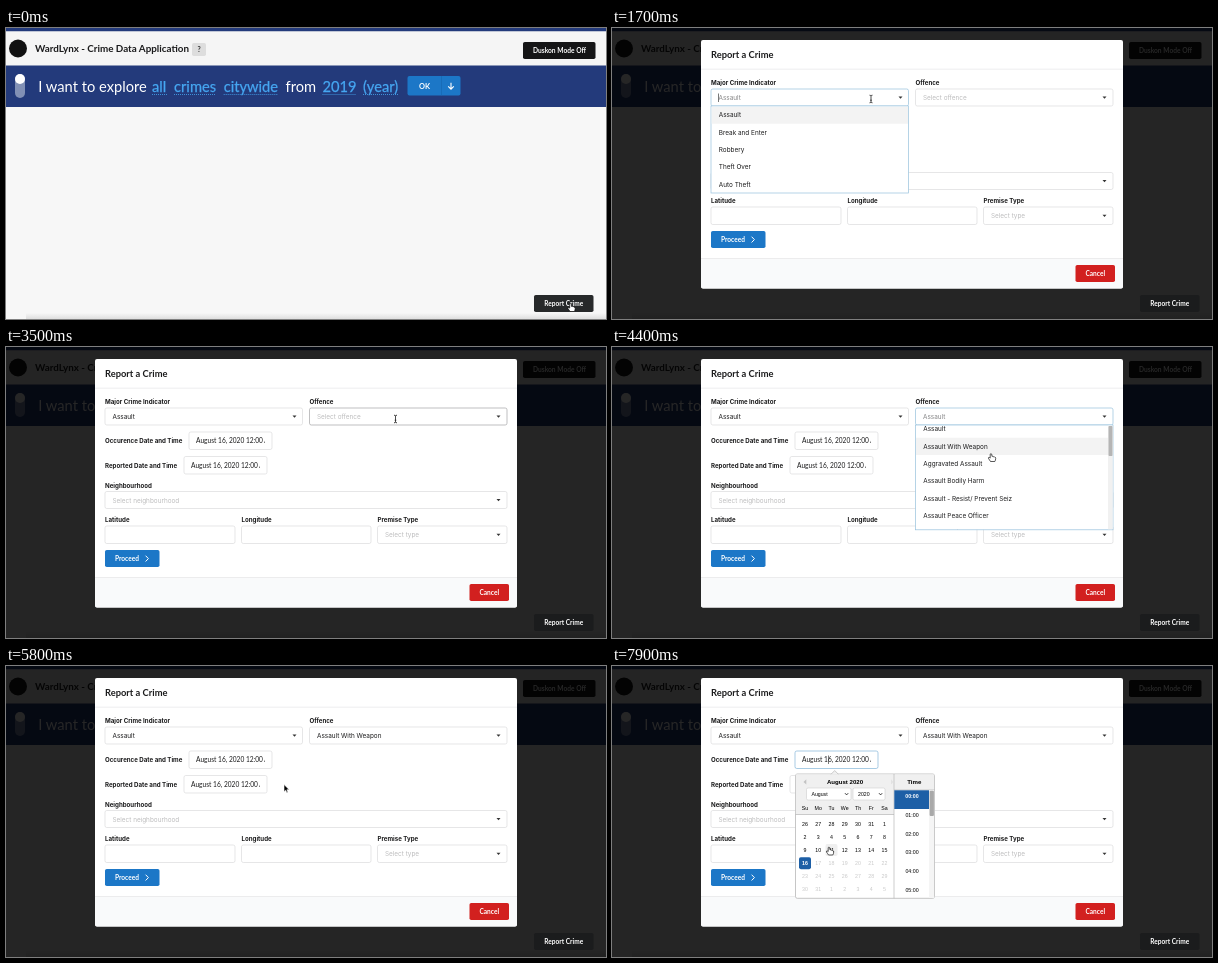
An HTML page that plays this animation: 600x291 px, repeating every 8 s.

```html
<!DOCTYPE html>
<html lang="en">
<head>
<meta charset="utf-8">
<title>Crime report form</title>
<style>
  html, body { margin: 0; width: 100%; height: 100%; overflow: hidden; background: #f7f7f7; }
  svg { display: block; width: 600px; height: 291px; }
  text { white-space: pre; }
  .lato { font-family: Lato, sans-serif; }
  .ui { font-family: Inter, sans-serif; }
  .cal { font-family: "Liberation Sans", Arial, sans-serif; }
</style>
</head>
<body>
<svg id="stage" viewBox="0 0 600 291" xmlns="http://www.w3.org/2000/svg"></svg>
<script>
const LOOP = 8000;
const INK = '#1c1c1d', HINT = '#bdbdbe', LINE = '#dcdcdd', BLUE = '#1c77c7', FOCUS = '#96c0dc';

const rect = (x, y, x2, y2, fill, more = '') =>
  `<rect x="${x}" y="${y}" width="${x2 - x}" height="${y2 - y}" fill="${fill}" ${more}/>`;
// cy is the middle of the capitals
const text = (x, cy, str, size, font, fill = INK, more = '') =>
  `<text x="${x}" y="${cy + size * 0.36}" class="${font}" font-size="${size}" fill="${fill}" ${more}>${str}</text>`;
const BOLD = 'font-weight="700"', MID = 'text-anchor="middle"', END = 'text-anchor="end"';
const group = (id, body, more = '') => `<g id="${id}" ${more}>${body}</g>`;
const clip = (id, ...box) => `<clipPath id="${id}">${rect(...box, '#000')}</clipPath>`;

const label = (x, cy, str) => text(x, cy, str, 6.15, 'ui', INK, BOLD);
const value = (x, cy, str, fill, more) => text(x, cy, str, 6.4, 'ui', fill, more);
const field = (x, y, x2, y2, id = '') =>
  rect(x, y, x2, y2, '#fff', `rx="1.8" stroke="${LINE}" stroke-width=".7" ${id && `id="${id}"`}`);
const caret = (x, y) => `<path d="M${x - 2} ${y - 1}h4l-2 2.3z" fill="#333"/>`;
const button = (x, y, x2, y2, str, fill, id = '') =>
  rect(x, y, x2, y2, fill, `rx="1.8" ${id && `id="${id}"`}`) +
  text((x + x2) / 2, (y + y2) / 2, str, 6.55, 'lato', '#fff', `${BOLD} ${MID}`);

function page() {
  const words = [
    [32.3, 'I want to explore'], [146, 'all', 161], [168, 'crimes', 210], [217.7, 'citywide', 272],
    [279.5, 'from'], [316.5, '2019', 350], [357, '(year)', 393]
  ].map(([x, str, end]) => {
    const color = end ? '#46a7f2' : '#fff';
    return text(x, 58.5, str, 14.7, 'lato', color, end ? `stroke="${color}" stroke-width=".25"` : '') +
      (end ? `<path d="M${x} 66.5H${end}" stroke="${color}" stroke-width=".8" stroke-dasharray="1 1"/>` : '');
  }).join('');
  return rect(0, 0, 600, 291, '#f7f7f7') +
    rect(0, 0, 600, 3.5, '#233a7b') + rect(0, 3.5, 600, 37.5, '#f5f5f5') +
    rect(0, 37.5, 600, 79, '#233a7b') +
    rect(20, 285, 600, 291, 'url(#shade)') +
    '<circle cx="12" cy="20.5" r="9" fill="#111"/>' +
    text(29, 20.5, 'WardLynx', 9.85, 'lato', INK, BOLD) +
    text(183, 20.5, '- Crime Data Application', 9.85, 'lato', INK, `${BOLD} ${END}`) +
    rect(186, 15, 200, 28, '#dddddd', 'rx="1.8"') +
    text(193, 21.5, '?', 7, 'lato', '#333', `${BOLD} ${MID}`) +
    rect(517, 14, 589.5, 31, '#151516', 'rx="1.8"') +
    text(527, 22.5, 'Duskon', 6.65, 'lato', '#fff', BOLD) +
    text(580, 22.5, 'Mode Off', 6.65, 'lato', '#fff', `${BOLD} ${END}`) +
    rect(9, 46, 19, 70, '#8190b5', 'rx="5"') + '<circle cx="14" cy="51" r="5" fill="#fff"/>' +
    words +
    rect(401.5, 48, 454.5, 67.5, BLUE, 'rx="2"') +
    rect(435, 48, 435.6, 67.5, '#1767ad') +
    text(418.5, 58, 'OK', 7.4, 'lato', '#fff', `${BOLD} ${MID}`) +
    '<path d="M445 54.7v6.4m-2.8-2.7l2.8 2.8 2.8-2.8" fill="none" stroke="#fff" stroke-width="1.1"/>';
}

function form() {
  const dates = [[183, 85, 'Occurence', 'when'], [178, 109.5, 'Reported', 'told']].map(([x, y, str, id]) =>
    label(99, y + 9, `${str} Date and Time`) + field(x, y, x + 83, y + 17.5, id) +
    clip(id + 'Clip', x, y, x + 76, y + 18) +
    `<g clip-path="url(#${id}Clip)">${text(x + 7, y + 9, 'August 16, 2020 12:00 AM', 6.6, 'lato')}</g>`).join('');
  return rect(89, 12, 511, 260.5, '#fff', 'rx="2"') +
    text(99, 26.5, 'Report a Crime', 9.35, 'lato', INK, BOLD) +
    rect(89, 40.8, 511, 41.4, '#e2e2e3') +
    label(99, 54.5, 'Major Crime Indicator') + label(303.5, 54.5, 'Offence') +
    field(99, 61, 296.5, 78, 'kind') + caret(288.5, 69.5) + value(106.5, 69.7, '', HINT, 'id="kindText"') +
    field(303.5, 61, 501, 78, 'offence') + caret(492.5, 69.5) + value(311, 69.7, '', HINT, 'id="offenceText"') +
    rect(106, 65.5, 106.6, 74, '#222', 'id="kindCaret"') +
    rect(310.4, 65.5, 311, 74, '#222', 'id="offenceCaret"') +
    dates + rect(216, 89.5, 216.6, 98, '#222', 'id="dateCaret"') +
    label(99, 138.3, 'Neighbourhood') + field(99, 144.5, 501, 161.5) + caret(492.5, 153) +
    value(106.5, 153.2, 'Select neighbourhood', HINT) +
    label(99, 173, 'Latitude') + field(99, 179, 229, 196.5) +
    label(235.5, 173, 'Longitude') + field(235.5, 179, 365, 196.5) +
    label(371.5, 173, 'Premise Type') + field(371.5, 179, 501, 196.5) + caret(492.5, 187.7) +
    value(379, 188, 'Select type', HINT) +
    rect(99, 203, 153.5, 220, BLUE, 'rx="1.8"') +
    text(109, 211.6, 'Proceed', 6.55, 'lato', '#fff', BOLD) +
    '<path d="M139.6 208.7l2.8 2.9-2.8 2.9" fill="none" stroke="#fff" stroke-width="1"/>' +
    '<path d="M89 230.5H511V258.5a2 2 0 0 1-2 2H91a2 2 0 0 1-2-2z" fill="#f9fafb"/>' +
    rect(89, 230.3, 511, 230.9, '#e2e2e3') +
    button(463.5, 237, 503, 254, 'Cancel', '#d2201f');
}

function menu(id, x, y2, items, bar = '') {
  const list = items.map((s, i) => value(x + 7.8, 87 + i * 17.35, s)).join('');
  return group(id,
    rect(x, 78, x + 197.5, y2, '#fff', `stroke="${FOCUS}" stroke-width=".7"`) +
    clip(id + 'Clip', x + 0.4, 78.4, x + 197.1, y2 - 0.4) +
    `<g clip-path="url(#${id}Clip)">` +
    group(id + 'List', rect(x + 0.4, 78.4, x + 197.1, 95.7, '#f3f3f3', `id="${id}Hot"`) + list) + bar + '</g>');
}

function picker() {
  const cols = i => 193 + i * 13.25;
  let days = '';
  for (let i = 0; i < 42; i++) {
    const x = cols(i % 7), y = 158 + Math.floor(i / 7) * 13.05;
    const n = i < 6 ? 26 + i : i < 37 ? i - 5 : i - 36;
    if (i === 21) days += rect(187, y - 6, 199, y + 6, '#1d5fa6', 'rx="1.8"');
    if (i === 16) days += rect(x - 6, y - 6, x + 6, y + 6, '#efefef', 'rx="1.8" id="dayHot"');
    days += text(x, y, n, 5.25, 'cal', i === 21 ? '#fff' : i > 21 ? '#c9c9c9' : '#000',
      MID + (i === 21 ? ' ' + BOLD : ''));
  }
  const heads = ['Su', 'Mo', 'Tu', 'We', 'Th', 'Fr', 'Sa']
    .map((s, i) => text(cols(i), 142, s, 5.25, 'cal', '#000', MID)).join('');
  const hours = [0, 1, 2, 3, 4, 5].map(h =>
    text(300, 130.5 + h * 18.7, `0${h}:00`, 5.25, 'cal', h ? '#000' : '#fff', MID + (h ? '' : ' ' + BOLD))).join('');
  const select = (x, x2, str) =>
    rect(x, 122, x2, 134, '#fff', 'rx="1.5" stroke="#c4c4c4" stroke-width=".5"') +
    text(x + 5, 128, str, 5.2, 'cal', '#000') +
    `<path d="M${x2 - 6} 127.2l1.6 1.7 1.6-1.7" fill="none" stroke="#222" stroke-width=".9"/>`;
  return group('picker',
    rect(183.5, 108, 322.5, 232.3, '#fff', 'rx="1.8" stroke="#aeaeae" stroke-width=".7"') +
    rect(183.9, 108.4, 281.8, 148.5, '#f0f0f0') + rect(282.2, 108.4, 322.1, 124, '#f0f0f0') +
    '<path d="M183.5 148.5H282M282 124H322.5M282 108V232.3" stroke="#aeaeae" stroke-width=".6"/>' +
    '<path d="M219 108.3l3.7-3.8 3.7 3.8" fill="#f0f0f0" stroke="#aeaeae" stroke-width=".6"/>' +
    '<path d="M194.3 113.2v5.4l-2.8-2.7z" fill="#c2c2c2"/><path d="M279 113.2v5.4l2.4-2.7z" fill="#e2e2e2"/>' +
    text(233, 116, 'August 2020', 6.1, 'cal', '#000', `${BOLD} ${MID}`) +
    text(302.3, 116, 'Time', 6.1, 'cal', '#000', `${BOLD} ${MID}`) +
    select(194.5, 239, 'August') + select(241, 273, '2020') + heads + days +
    rect(282.3, 124.3, 317, 143, '#1d5fa6') + hours +
    rect(317, 124.3, 322.1, 232, '#f5f5f5') + rect(317.6, 124.8, 321.9, 150, '#a9a9a9', 'rx="1"'));
}

const cursors =
  '<path id="arrow" d="M0 0v7.2l1.7-1.5 1.1 2.5 1.2-.5-1.1-2.5h2.3z" fill="#000" stroke="#fff" stroke-width=".6"/>' +
  '<path id="hand" d="M-.8.6q.8-1.2 1.5 0l.3 2.3q1-.5 1.4.3 1-.3 1.3.5 1.1 0 1 1.2-.1 2-.9 3.1H-.5Q-1.4 6.500-2.5 5q-.4-1.200.7-1.100l1 .7z" fill="#fff" stroke="#000" stroke-width=".65"/>' +
  '<path id="beam" d="M-1.500-3.800q1.300 0 1.500.7.200-.7 1.500-.7M-1.500 3.800q1.300 0 1.500-.7.200.7 1.500.7M0-3.300V3.300M-.8 1.200H.8" fill="none" stroke="#111" stroke-width=".75"/>';

const stage = document.getElementById('stage');
stage.innerHTML =
  '<defs><linearGradient id="shade" x1="0" y1="0" x2="0" y2="1"><stop offset="0" stop-color="#f7f7f7"/>' +
  '<stop offset="1" stop-color="#dedede"/></linearGradient></defs>' +
  page() + rect(0, 0, 600, 291, '#000', 'id="dim"') +
  button(528, 267, 587.5, 284, 'Report Crime', '#1b1c1d', 'report') +
  group('modal', form() +
    menu('kinds', 99, 165, ['Assault', 'Break and Enter', 'Robbery', 'Theft Over', 'Auto Theft']) +
    menu('offences', 303.5, 182.8,
      ['Assault', 'Assault With Weapon', 'Aggravated Assault', 'Assault Bodily Harm',
        'Assault - Resist/ Prevent Seiz', 'Assault Peace Officer', 'Assault Police'],
      rect(496, 78.4, 501, 182.5, '#f1f1f1') + rect(496.5, 79, 500.8, 109, '#b5b5b5', 'id="thumb" rx="1"')) +
    picker()) +
  group('cursor', cursors);

const el = {};
stage.querySelectorAll('[id]').forEach(n => el[n.id] = n);
const set = (id, name, v) => el[id].setAttribute(name, v);
const show = (id, on) => set(id, 'opacity', +on);

const ramp = (t, a, b) => Math.min(1, Math.max(0, (t - a) / (b - a)));
const ease = p => p * p * (3 - 2 * p);
const within = (t, a, b) => t >= a && t < b;

// time, x, y, pointer shape from then on
const path = [
  [0, 564.5, 275.5, 'hand'], [180, 564.5, 275.5, 'hand'], [260, 510, 250, 'arrow'],
  [600, 280.5, 136.5, 'arrow'], [900, 276, 125, 'arrow'], [1200, 262, 75, 'beam'],
  [1400, 259, 71, 'beam'], [1900, 259, 71, 'beam'], [2000, 254, 80, 'hand'],
  [2200, 243, 86, 'hand'], [2500, 243, 86, 'hand'], [2600, 246, 85, 'arrow'],
  [3200, 380, 74, 'beam'], [3450, 389.5, 72, 'beam'], [3900, 389.5, 72, 'beam'],
  [4050, 386, 84, 'hand'], [4300, 379, 106.5, 'hand'], [4700, 379, 106.5, 'hand'],
  [4850, 379, 107, 'arrow'], [5700, 278, 118.5, 'arrow'], [6000, 278, 118.5, 'arrow'],
  [6300, 240, 97, 'beam'], [6600, 219, 94, 'beam'], [7100, 219, 94, 'beam'],
  [7250, 219, 110, 'arrow'], [7500, 218, 158, 'hand'], [7850, 217, 181, 'hand'], [LOOP, 217, 181, 'hand']
];

function moveCursor(t) {
  const i = path.findIndex(k => k[0] > t) - 1;
  const [a, x, y, shape] = path[i], [b, x2, y2] = path[i + 1];
  const p = ramp(t, a, b);
  set('cursor', 'transform', `translate(${x + (x2 - x) * p} ${y + (y2 - y) * p})`);
  for (const id of ['arrow', 'hand', 'beam']) show(id, id === shape);
}

function drop(id, t, open, close) {
  const p = ease(ramp(t, open, open + 180)) * (1 - ramp(t, close, close + 120));
  set(id, 'opacity', p);
  set(id, 'transform', `translate(0 ${78 * (1 - p)}) scale(1 ${p || 0.001})`);
}

function choice(id, t, open, close, hint, pick, hover) {
  const isOpen = within(t, open, close);
  el[id + 'Text'].textContent = t < open ? hint : isOpen ? 'Assault' : pick;
  set(id + 'Text', 'fill', t < open ? HINT : isOpen ? '#858586' : INK);
  set(id, 'stroke', isOpen ? FOCUS : within(t, hover, open) ? '#a5a5a6' : LINE);
  show(id + 'Caret', isOpen && (t - open) % 1000 < 550);
}

function draw(t) {
  const p = ease(ramp(t, 100, 550)), s = 0.8 + 0.2 * p;
  set('dim', 'opacity', 0.85 * p);
  set('modal', 'opacity', p);
  set('modal', 'transform', `translate(${300 * (1 - s)} ${136 * (1 - s)}) scale(${s})`);
  set('report', 'fill', t < 220 ? '#27292a' : '#1b1c1d');

  choice('kind', t, 1300, 2450, 'Select indicator', 'Assault', 1180);
  drop('kinds', t, 1300, 2450);
  choice('offence', t, 3750, 4650, 'Select offence', 'Assault With Weapon', 3000);
  drop('offences', t, 3750, 4650);
  const scroll = 5 * ease(ramp(t, 4050, 4300));
  set('offencesList', 'transform', `translate(0 ${-scroll})`);
  set('offencesHot', 'y', 78.4 + (t > 4200 ? 17.35 : 0));
  set('thumb', 'y', 78.6 + scroll * 0.1);

  const focus = t >= 6900;
  set('when', 'stroke', focus ? '#85b7d9' : LINE);
  show('dateCaret', focus && (t - 6900) % 1000 < 550 || t > 7850);
  show('picker', focus);
  show('dayHot', t > 7750);
  moveCursor(t);
}

function tick(now) {
  draw(now % LOOP);
  requestAnimationFrame(tick);
}
draw(0);
requestAnimationFrame(tick);
</script>
</body>
</html>
```
